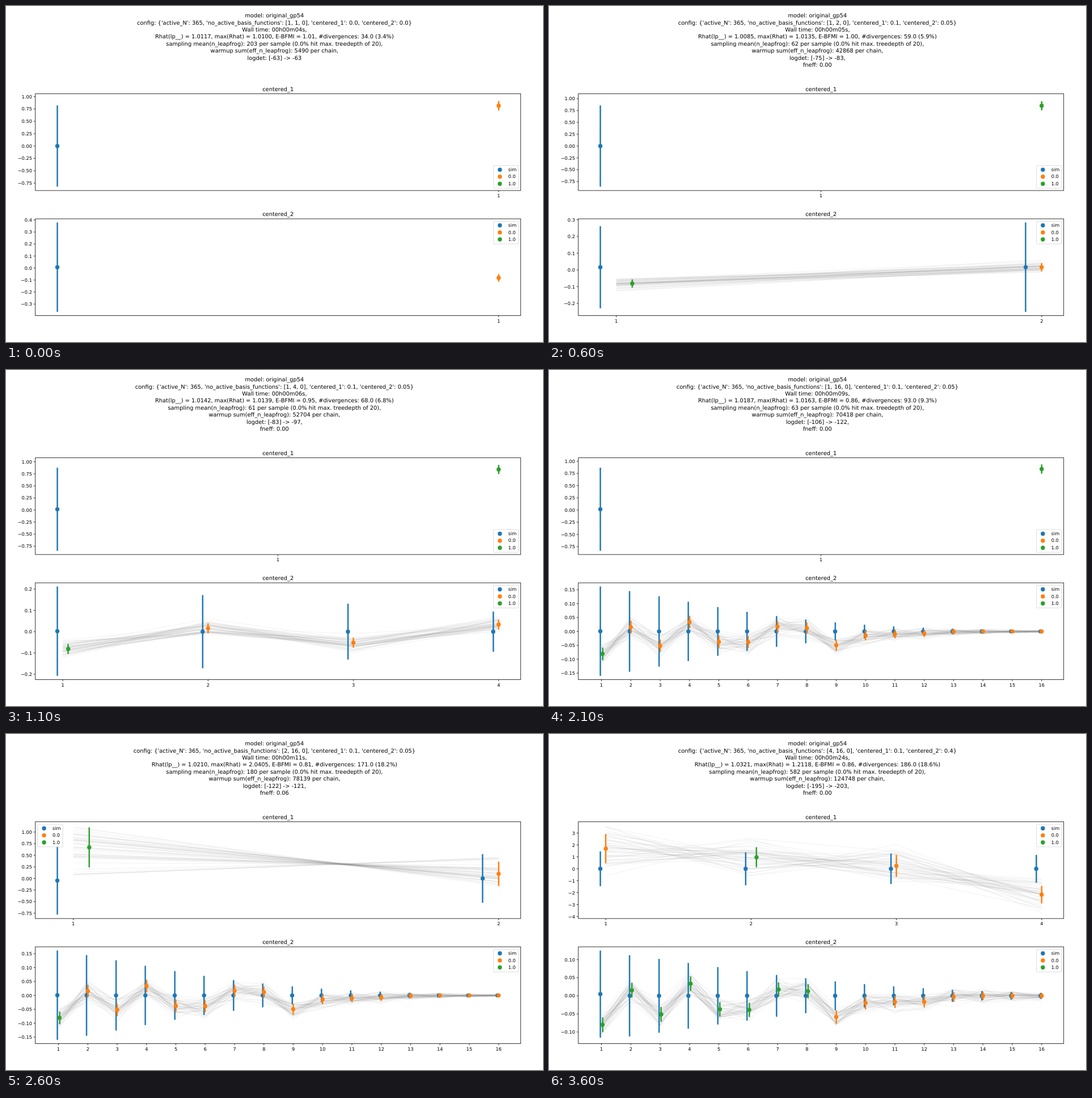
These frames come from a looping animation (947x592 px, 4.1 s). An HTML page:

```html
<!DOCTYPE html>
<html lang="en">
<head>
<meta charset="utf-8">
<title>Basis function fits</title>
<style>
  html, body { margin: 0; width: 100%; height: 100%; overflow: hidden; background: #fff; }
  svg { display: block; width: 947px; height: 592px; font-family: "DejaVu Sans", sans-serif; font-size: 8.22px; text-rendering: geometricPrecision; }
  .big { font-size: 9.865px; }
</style>
</head>
<body>
<svg id="stage" viewBox="0 0 947 592"></svg>
<script>
const BLUE = '#1f77b4', ORANGE = '#ff7f0e', GREEN = '#2ca02c';
const FRAME = { left: 51.7, right: 907.7, height: 170.4 };
const DATA = { left: 90.55, right: 868.8 };
const MARGIN = FRAME.height / 22;
const DODGE = 0.0375;
const GRID = 947 / 1600;
const FIRST_HOLD = 100, HOLD = 500;

// Weights of the basis functions before shrinkage; the rest are zero.
const WEIGHTS = [-0.082, 0.016, -0.053, 0.035, -0.0395, -0.042, 0.0195, 0.015, -0.073, -0.027, -0.027, -0.033, -0.008];

// Deterministic standard normal numbers
function normals(seed) {
  const uniform = () => {
    seed = (seed * 1664525 + 1013904223) % 4294967296;
    return (seed + 0.5) / 4294967296;
  };
  return () => Math.sqrt(-2 * Math.log(uniform())) * Math.cos(2 * Math.PI * uniform());
}

const snap = v => Math.round(v / GRID) * GRID;
const clamp = (v, low, high) => Math.min(Math.max(v, low), high);
const text = (x, y, str, anchor = 'middle', cls = '') =>
  `<text x="${x}" y="${y}" text-anchor="${anchor}" class="${cls}">${str}</text>`;
const line = (x1, y1, x2, y2, color, width, cap = 'butt') =>
  `<path d="M${x1} ${y1}L${x2} ${y2}" stroke="${color}" stroke-width="${width}" stroke-linecap="${cap}"/>`;
const dot = (x, y, color) => `<circle cx="${x}" cy="${y}" r="3.7" fill="${color}"/>`;
const bar = (x, mid, half, color) =>
  line(snap(x), mid - half, snap(x), mid + half, color, 2.47, 'square') + dot(x, mid, color);

function heading({ head: h, upper, lower }) {
  const lines = [
    'model: original_gp54',
    `config: {'active_N': 365, 'no_active_basis_functions': [${upper.n}, ${lower.n}, 0], 'centered_1': ${h.c1}, 'centered_2': ${h.c2}}`,
    `Wall time: 00h00m${h.wall}s,`,
    `Rhat(lp__) = ${h.rhat}, max(Rhat) = ${h.max}, E-BFMI = ${h.bfmi}, #divergences: ${h.div}`,
    `sampling mean(n_leapfrog): ${h.leap} per sample (0.0% hit max. treedepth of 20),`,
    `warmup sum(eff_n_leapfrog): ${h.warm} per chain,`,
    `logdet: ${h.logdet.replace('>', '&gt;')}` + (h.fneff ? ',' : '')
  ];
  if (h.fneff) lines.push('fneff: ' + h.fneff);
  return lines.map((s, i) => text(473.4, 20.2 + i * 12.42, s, 'middle', 'big')).join('');
}

function legend(x, y) {
  const rows = [['sim', BLUE], ['0.0', ORANGE], ['1.0', GREEN]];
  return `<rect x="${x}" y="${y}" width="44.3" height="40" rx="1.7" fill="#fff" fill-opacity=".8" stroke="#ccc" stroke-opacity=".8" stroke-width=".85"/>` +
    rows.map(([name, color], i) => dot(x + 11.2, y + 7.3 + i * 12.4, color) +
      text(x + 26, y + 9.9 + i * 12.4, name, 'start')).join('');
}

// Prior widths fall with the index; the fit is the matching normal posterior.
function fit(p) {
  return Array.from({ length: p.n }, (_, i) => {
    const prior = p.half / p.unit * Math.exp(-p.decay * ((i + 1) ** 1.6 - 1));
    const shrink = prior ** 2 / (prior ** 2 + p.noise ** 2);
    return {
      prior,
      mean: p.means ? p.means[i] : (WEIGHTS[i] || 0) * shrink,
      sd: p.sds ? p.sds[i] : p.noise * Math.sqrt(shrink)
    };
  });
}

function draws(p, terms, xAt, yAt, inside) {
  const next = normals(p.n * 77 + p.unit);
  const rest = Math.sqrt(1 - p.rho ** 2);
  let out = '';
  for (let k = 0; k < 45;) {
    let z = 0, fits = true;
    const points = terms.map(({ mean, sd }, i) => {
      z = i ? -p.rho * z + rest * next() : next();
      const y = yAt(mean + z * sd);
      fits = fits && Math.abs(z) < 2.3 && inside(y);
      return `${xAt(i + 1).toFixed(1)},${y.toFixed(1)}`;
    });
    if (!fits) continue;
    out += `<polyline points="${points.join(' ')}"/>`;
    k++;
  }
  return `<g fill="none" stroke="#808080" stroke-width="1.2" stroke-opacity=".09">${out}</g>`;
}

function panel(p, name, top) {
  const n = p.n, bottom = top + FRAME.height;
  const terms = fit(p);
  const groups = p.groups.padEnd(n, 'o');
  const shift = i => groups[i] === 'g' ? DODGE : 0;
  const first = 1 - DODGE, last = n + shift(n - 1);
  const xAt = v => DATA.left + (v - first) / (last - first) * (DATA.right - DATA.left);
  const yAt = v => p.zero - v * p.unit;
  const inside = y => y > top + MARGIN && y < bottom - MARGIN;
  const [high, low, step, digits] = p.ticks;
  let out = n > 1 ? draws(p, terms, xAt, yAt, inside) : '';

  terms.forEach(({ prior }, i) => {
    const half = prior * p.unit;
    const mid = clamp(yAt(i ? 0 : p.drift), top + MARGIN + half, bottom - MARGIN - half);
    out += bar(xAt(i + 1 - DODGE), mid, half, BLUE);
  });
  terms.forEach(({ mean, sd }, i) =>
    out += bar(xAt(i + 1 + shift(i)), yAt(mean), sd * p.unit, groups[i] === 'g' ? GREEN : ORANGE));

  for (let k = 0; k <= Math.round((high - low) / step); k++) {
    const v = high - k * step, y = yAt(v);
    out += line(FRAME.left - 2.9, y, FRAME.left, y, '#000', 0.8) +
      text(45.9, y + 3, (v < -1e-9 ? '\u2212' : '') + Math.abs(v).toFixed(digits), 'end');
  }
  for (let i = 1; i <= n; i++) {
    out += line(xAt(i), bottom, xAt(i), bottom + 2.9, '#000', 0.8) + text(xAt(i), bottom + 12.1, i);
  }
  out += `<rect x="${FRAME.left}" y="${top}" width="${FRAME.right - FRAME.left}" height="${FRAME.height}" fill="none" stroke="#000" stroke-width=".8"/>`;
  out += text((FRAME.left + FRAME.right) / 2, top - 4.9, name, 'middle', 'big');
  return out + legend(p.legend.endsWith('left') ? 55.9 : 859.7, p.legend.startsWith('top') ? top + 4.2 : bottom - 44);
}

const plot = options => ({
  n: 1, half: 77.5, decay: 0, noise: 0.0205, drift: 0, rho: 0, groups: 'g', legend: 'top right', ...options
});
const quarters = [1, -0.75, 0.25, 2];
const twentieths = [0.15, -0.15, 0.05, 2];
const single = (half, mean, unit, groups) => plot({
  zero: 246.7, unit, half, ticks: quarters, means: [mean], sds: [0.081], legend: 'bottom right', groups
});
const lone = groups => plot({ zero: 461.7, unit: 211.6, ticks: [0.4, -0.3, 0.1, 1], noise: 0.026, groups });
const sixteen = plot({ n: 16, zero: 460.6, unit: 490, decay: 0.051, ticks: twentieths });

const scenes = [
  {
    head: { c1: '0.0', c2: '0.0', wall: '04', rhat: '1.0117', max: '1.0100', bfmi: '1.01', div: '34.0 (3.4%)', leap: 203, warm: 5490, logdet: '[-63] -> -63' },
    upper: single(70.3, 0.815, 87.1, 'o'),
    lower: lone('o')
  },
  {
    head: { c1: '0.1', c2: '0.05', wall: '04', rhat: '1.0093', max: '1.0121', bfmi: '1.02', div: '47.0 (4.7%)', leap: 64, warm: 24310, logdet: '[-63] -> -75', fneff: '0.00' },
    upper: single(70.3, 0.84, 85, 'g'),
    lower: lone('g')
  },
  {
    head: { c1: '0.1', c2: '0.05', wall: '05', rhat: '1.0085', max: '1.0135', bfmi: '1.00', div: '59.0 (5.9%)', leap: 62, warm: 42868, logdet: '[-75] -> -83', fneff: '0.00' },
    upper: single(70.3, 0.85, 83.4, 'g'),
    lower: plot({ n: 2, zero: 465, unit: 295, half: 71.1, decay: -0.0425, drift: 0.016, ticks: [0.3, -0.2, 0.1, 1] })
  },
  {
    head: { c1: '0.1', c2: '0.05', wall: '06', rhat: '1.0142', max: '1.0139', bfmi: '0.95', div: '68.0 (6.8%)', leap: 61, warm: 52704, logdet: '[-83] -> -97', fneff: '0.00' },
    upper: single(72, 0.84, 85, 'g'),
    lower: plot({ n: 4, zero: 461, unit: 375, decay: 0.1, ticks: [0.2, -0.2, 0.1, 1] })
  },
  {
    head: { c1: '0.1', c2: '0.05', wall: '07', rhat: '1.0269', max: '1.0148', bfmi: '0.90', div: '79.0 (7.9%)', leap: 61, warm: 62572, logdet: '[-97] -> -106', fneff: '0.00' },
    upper: single(74.3, 0.84, 87.1, 'g'),
    lower: plot({ n: 8, zero: 466.5, unit: 432, decay: 0.092, ticks: [0.2, -0.15, 0.05, 2] })
  },
  {
    head: { c1: '0.1', c2: '0.05', wall: '09', rhat: '1.0187', max: '1.0163', bfmi: '0.86', div: '93.0 (9.3%)', leap: 63, warm: 70418, logdet: '[-106] -> -122', fneff: '0.00' },
    upper: single(72, 0.84, 86, 'g'),
    lower: sixteen
  },
  {
    head: { c1: '0.1', c2: '0.05', wall: '11', rhat: '1.0210', max: '2.0405', bfmi: '0.81', div: '171.0 (18.2%)', leap: 180, warm: 78139, logdet: '[-122] -> -121', fneff: '0.06' },
    upper: plot({
      n: 2, zero: 254.5, unit: 81.7, half: 58.8, decay: 0.171, drift: -0.045, ticks: quarters,
      means: [0.67, 0.1], sds: [0.417, 0.248], rho: 0.997, legend: 'top left'
    }),
    lower: sixteen
  },
  {
    head: { c1: '0.1', c2: '0.4', wall: '12', rhat: '1.0088', max: '1.0129', bfmi: '0.97', div: '147.0 (14.7%)', leap: 77, warm: 106413, logdet: '[-121] -> -195', fneff: '0.00' },
    upper: plot({
      n: 2, zero: 264.8, unit: 82.9, half: 52.6, decay: 0.087, ticks: [1.25, -0.5, 0.25, 2],
      means: [0.46, 0.23], sds: [0.426, 0.251], rho: 0.985, groups: 'og'
    }),
    lower: plot({ n: 16, zero: 462.5, unit: 523, decay: 0.049, ticks: twentieths, groups: 'gggggggg' })
  },
  {
    head: { c1: '0.1', c2: '0.4', wall: '24', rhat: '1.0321', max: '1.2118', bfmi: '0.86', div: '186.0 (18.6%)', leap: 582, warm: 124748, logdet: '[-195] -> -203', fneff: '0.00' },
    upper: plot({
      n: 4, zero: 237.5, unit: 21, half: 29.5, decay: 0.029, ticks: [3, -4, 1, 0],
      means: [1.69, 0.97, 0.24, -2.17], sds: [1.17, 0.78, 0.86, 0.68], rho: 0.65, groups: 'ogoo'
    }),
    lower: plot({
      n: 16, zero: 461.3, unit: 637, half: 75.5, decay: 0.035, noise: 0.0187, drift: 0.005,
      ticks: [0.1, -0.1, 0.05, 2], groups: 'gggggggg'
    })
  }
];

const stage = document.getElementById('stage');
stage.innerHTML = scenes.map(s =>
  `<g display="none">${heading(s)}${panel(s.upper, 'centered_1', 154.7)}${panel(s.lower, 'centered_2', 375)}</g>`
).join('');
const layers = [...stage.children];
const loop = FIRST_HOLD + (scenes.length - 1) * HOLD;
let shown = -1;

function render(now) {
  const t = now % loop;
  const index = t < FIRST_HOLD ? 0 : 1 + Math.floor((t - FIRST_HOLD) / HOLD);
  if (index === shown) return;
  layers.forEach((layer, i) => layer.setAttribute('display', i === index ? 'inline' : 'none'));
  shown = index;
}

const start = performance.now();
function tick() {
  render(performance.now() - start);
  requestAnimationFrame(tick);
}
tick();
</script>
</body>
</html>
```
